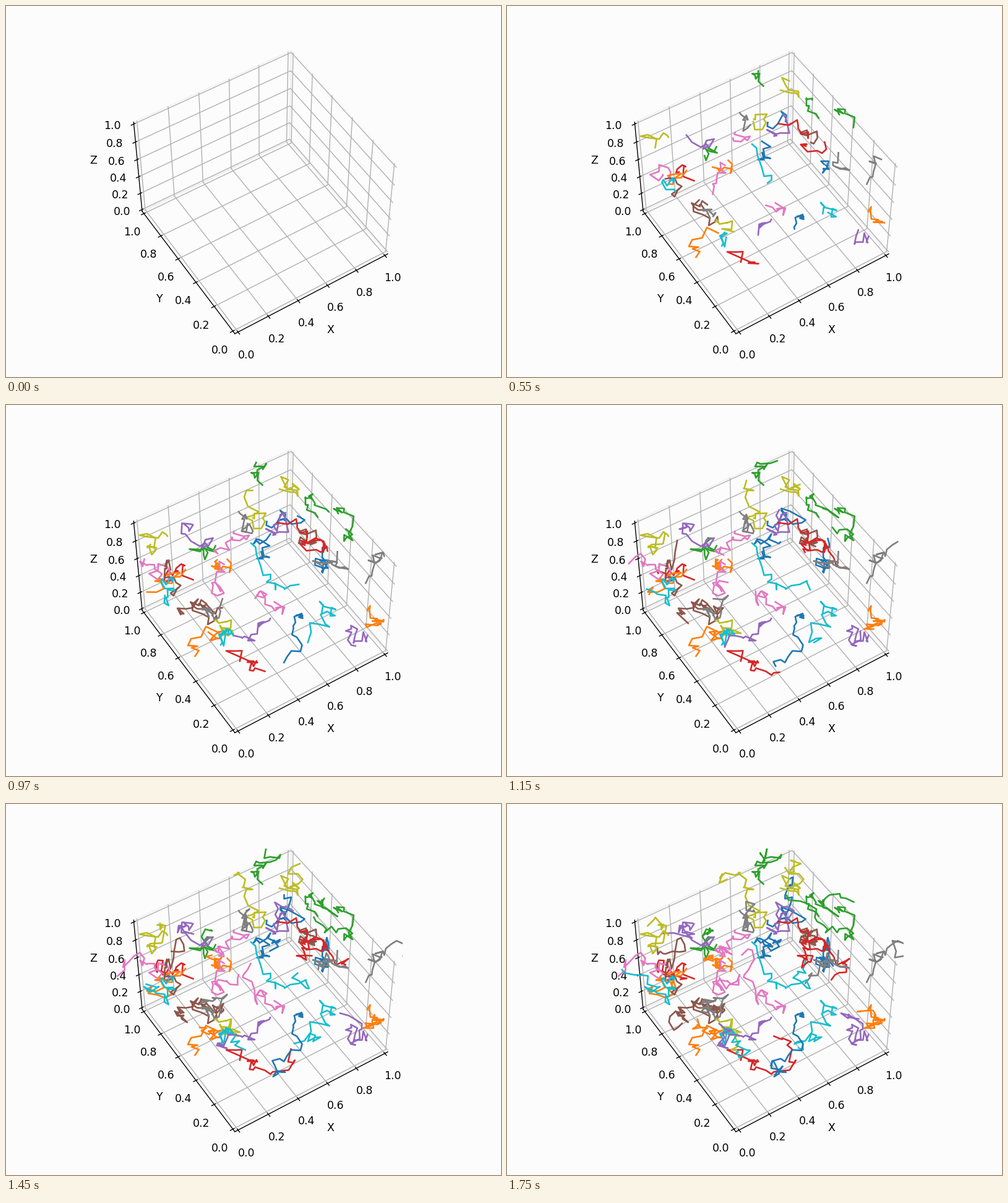
These frames come from a looping animation (800x600 px, 1810 ms). A matplotlib script:

```python
import matplotlib.pyplot as plt
import numpy as np
from matplotlib.animation import FuncAnimation

STEPS, WALKS, MAX_STEP = 30, 40, 0.05
TICK, LOOP = 10, 1810          # ms
FIRST, HOLD = 130, 60          # ms of empty box, ms per new segment
BACK = "#fcfcfc"

np.random.seed(19680801)
plt.rcParams["axes3d.automargin"] = True   # panes reach a little past 0 and 1


def random_walk():
    start = np.random.random(3)
    steps = np.random.uniform(-MAX_STEP, MAX_STEP, size=(STEPS, 3))
    return start + np.cumsum(steps, axis=0)


def points_at(t):
    """Number of walk points visible at time t."""
    return 1 if t < FIRST else 2 + (t - FIRST) // HOLD


walks = [random_walk() for _ in range(WALKS)]

fig = plt.figure(figsize=(6.4, 4.8), dpi=125, facecolor=BACK)
ax = fig.add_subplot(projection="3d", facecolor=BACK)
ax.view_init(elev=50, azim=-122.5)
ax.set(xlim3d=(0, 1), ylim3d=(0, 1), zlim3d=(0, 1),
       xlabel="X", ylabel="Y", zlabel="Z")
for axis in (ax.xaxis, ax.yaxis, ax.zaxis):
    axis.pane.fill = False

lines = [ax.plot([], [], [])[0] for _ in walks]


def update(i):
    n = points_at(i * TICK)
    for line, walk in zip(lines, walks):
        line.set_data_3d(walk[:n].T)
    return lines


anim = FuncAnimation(fig, update, frames=LOOP // TICK, interval=TICK,
                     init_func=lambda: update(0), repeat=True, repeat_delay=0)
plt.show()
```
